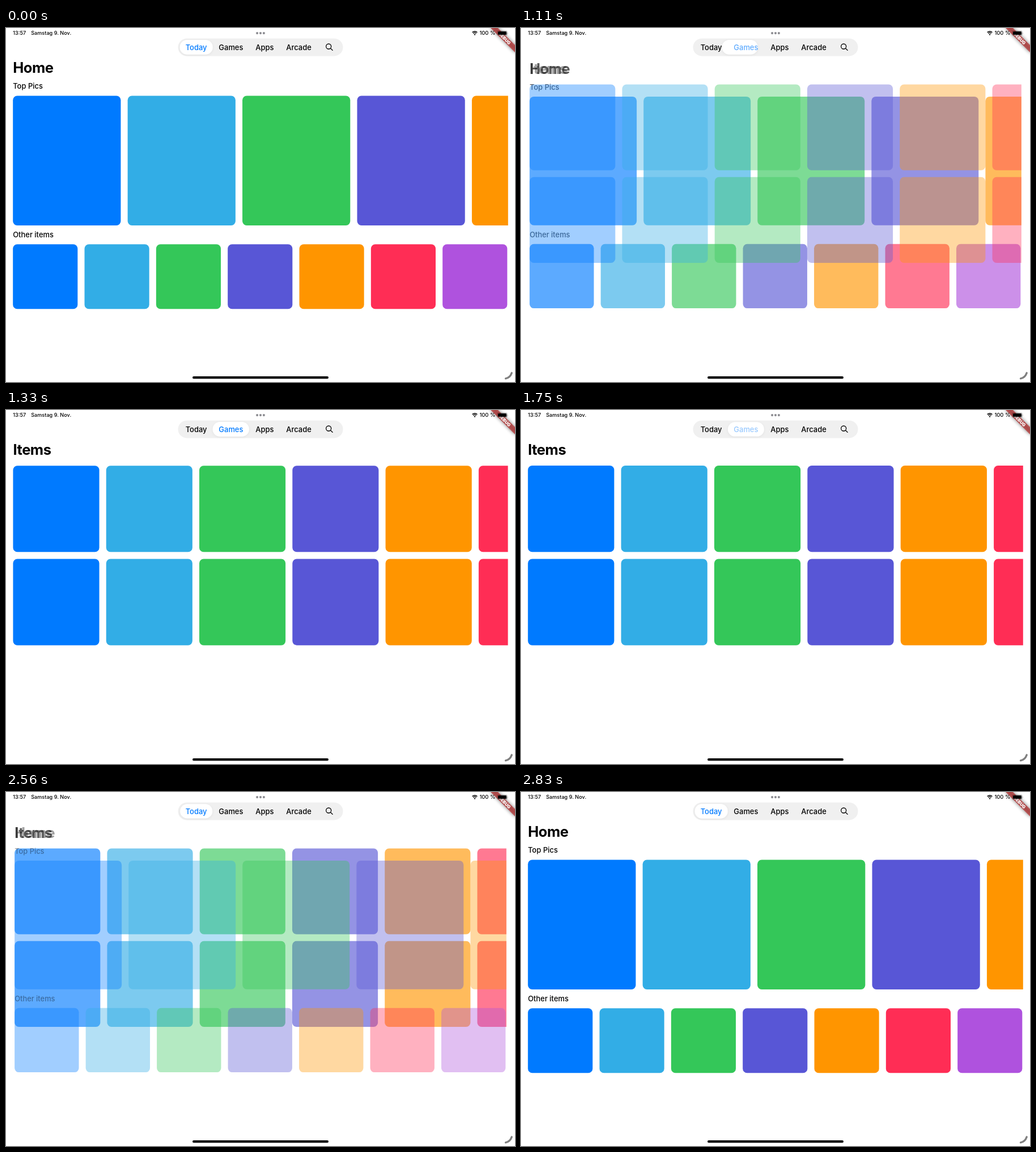
Write an HTML page that moves like this. It is 898 px wide and 624 px high and loops after 4.13 s.

```html
<!DOCTYPE html>
<html lang="de">
<head>
<meta charset="utf-8">
<title>Tab bar</title>
<style>
html, body { margin: 0; width: 100%; height: 100%; overflow: hidden; background: #fff; }
svg { display: block; width: 898px; height: 624px; font-family: Inter, "Open Sans", sans-serif; }
.status { font-size: 9.15px; font-weight: 500; }
.tab { font-size: 12.95px; font-weight: 500; text-anchor: middle; }
.head { font-size: 12.95px; font-weight: 500; }
.title { font-size: 25.6px; font-weight: 700; letter-spacing: -.5px; }
.debug { font-size: 7.76px; font-weight: 900; text-anchor: middle; fill: #fff; }
#thumb { fill: #fff; filter: drop-shadow(0 1px 2px rgba(0, 0, 0, .06)); }
</style>
</head>
<body>
<svg viewBox="0 0 898 624">
  <defs><clipPath id="clip"><path d="M0 0H885.8V624H0z"/></clipPath></defs>
  <g id="pages"></g>

  <rect x="303.5" y="18.4" width="291" height="31" rx="15.5" fill="#f0f0f0"/>
  <rect id="thumb"/>
  <g id="tabs"></g>
  <g fill="none" stroke="#000" stroke-width="1.3" stroke-linecap="round">
    <circle cx="569.2" cy="32.5" r="4.5"/>
    <path d="M572.6 35.9L576.1 39.3"/>
  </g>

  <g transform="translate(898 0) rotate(45)">
    <rect x="-30.4" y="21.3" width="60.9" height="9.1" fill-opacity=".5" style="filter:blur(3px)"/>
    <rect x="-30.4" y="21.3" width="60.9" height="9.1" fill="#b71c1c" fill-opacity=".627"/>
    <text class="debug" x="0" y="28.7">DEBUG</text>
  </g>

  <g class="status">
    <text x="12.2" y="12.3">13:57</text>
    <text x="44.2" y="12.3">Samstag 9. Nov.</text>
    <text x="835.4" y="12.3" font-size="9.4">100 %</text>
  </g>
  <g fill="#8e8e93">
    <circle cx="443.1" cy="9.1" r="2.1"/><circle cx="449" cy="9.1" r="2.1"/><circle cx="454.9" cy="9.1" r="2.1"/>
  </g>
  <path d="M822.6 7.7a6.3 6.3 0 0 1 8.8 0M824.3 9.6a3.9 3.9 0 0 1 5.4 0" fill="none" stroke="#000" stroke-width="1.5"/>
  <path d="M827 13l-1.6-1.7a2.2 2.2 0 0 1 3.2 0z"/>
  <rect x="866.8" y="4.9" width="17.6" height="8.4" rx="2.6" fill="none" stroke="#000" stroke-opacity=".4" stroke-width=".8"/>
  <rect x="868" y="6.1" width="15.2" height="6" rx="1.6"/>
  <path d="M885.3 7.7q1.2 1.4 0 2.8z" fill-opacity=".4"/>

  <rect x="329" y="613.9" width="240" height="4.4" rx="2.2"/>
  <path d="M881.5 617.9Q889.5 616.2 892.2 608" fill="none" stroke="#808080" stroke-width="3.4" stroke-linecap="round"/>
</svg>
<script>
const LOOP = 4130, FADE = 220, DIP = 90, SETTLE = 360;
const colors = ['#007aff', '#32ade6', '#34c759', '#5856d6', '#ff9500', '#ff2d55', '#af52de'];
const $ = id => document.getElementById(id);
const clamp = x => Math.min(1, Math.max(0, x));
const mix = (a, b, p) => a + (b - a) * p;
const ramp = (t, from, to) => clamp((t - from) / (to - from));
const smooth = x => x * x * (3 - 2 * x);

// Critically damped spring, 0 to 1
function spring(t, start) {
  const w = .02244 * Math.max(0, t - start);
  return 1 - (1 + w) * Math.exp(-w);
}

function row(count, y, w, h) {
  return colors.slice(0, count).map((c, i) =>
    `<rect x="${12.2 + i * (w + 12.18)}" y="${y}" width="${w}" height="${h}" rx="7.6" fill="${c}"/>`).join('');
}
const label = (cls, y, s) => `<text class="${cls}" x="12.2" y="${y}">${s}</text>`;
const page = (id, body) => `<g id="${id}"><g clip-path="url(#clip)">${body}</g></g>`;

$('pages').innerHTML =
  page('home', label('title', 79.3, 'Home') + label('head', 107.4, 'Top Pics') + row(5, 119.6, 190.25, 228.3) +
    label('head', 369.2, 'Other items') + row(7, 381.2, 114.15, 114.15)) +
  page('items', label('title', 79.3, 'Items') + row(6, 98.1, 152.2, 152.2) + row(6, 262.5, 152.2, 152.2));
const home = $('home'), items = $('items'), thumb = $('thumb');

$('tabs').innerHTML = [['Today', 335.6], ['Games', 396.9], ['Apps', 456.4], ['Arcade', 516.5]]
  .map(([s, x]) => `<text class="tab" x="${x}" y="38.6">${s}</text>`).join('');
const [today, games] = $('tabs').children;

const tint = (el, p) => el.setAttribute('fill', `rgb(0,${122 * p},${255 * p})`);

function drawPages(t) {
  const back = t >= 2470;
  const dt = Math.max(0, t - (back ? 2470 : 1020));
  const alpha = (1 - Math.cos(Math.PI * clamp(dt / FADE))) / 2;
  const dip = dt < DIP ? smooth(dt / DIP) : 1 - smooth(ramp(dt, DIP, SETTLE));
  const [next, prev] = back ? [home, items] : [items, home];
  if (next.nextSibling) next.parentNode.append(next);
  next.setAttribute('opacity', alpha);
  prev.setAttribute('opacity', 1 - alpha);
  for (const p of [home, items])
    p.setAttribute('transform', `translate(449 312) scale(${1 - .0068 * dip}) translate(-449 -312)`);
}

function drawTabs(t) {
  const pos = t < 2030 ? spring(t, 970) : 1 - spring(t, 2030);
  const press = t < 2470 ? ramp(t, 1740, 1830) : 1 - spring(t, 2470);
  const scale = 1 - .05 * press;
  const w = mix(58.2, 64.4, pos) * scale, h = 25.6 * scale;
  const cx = mix(335.7, 396.9, pos);
  const box = { x: cx - w / 2, y: 33.9 - h / 2, width: w, height: h, rx: h / 2 };
  for (const k in box) thumb.setAttribute(k, box[k]);

  const on = t < 2030 ? ramp(t, 990, 1040) : 1 - ramp(t, 2030, 2130);
  tint(games, on);
  tint(today, 1 - on);
  let dim = 0;
  if (t < 1750) dim = ramp(t, 995, 1030) * (1 - ramp(t, 1030, 1240));
  else dim = 1 - ramp(t, 2030, 2150);
  games.setAttribute('opacity', 1 - .6 * dim);
}

function frame() {
  const t = performance.now() % LOOP;
  drawPages(t);
  drawTabs(t);
  requestAnimationFrame(frame);
}
frame();
</script>
</body>
</html>
```
